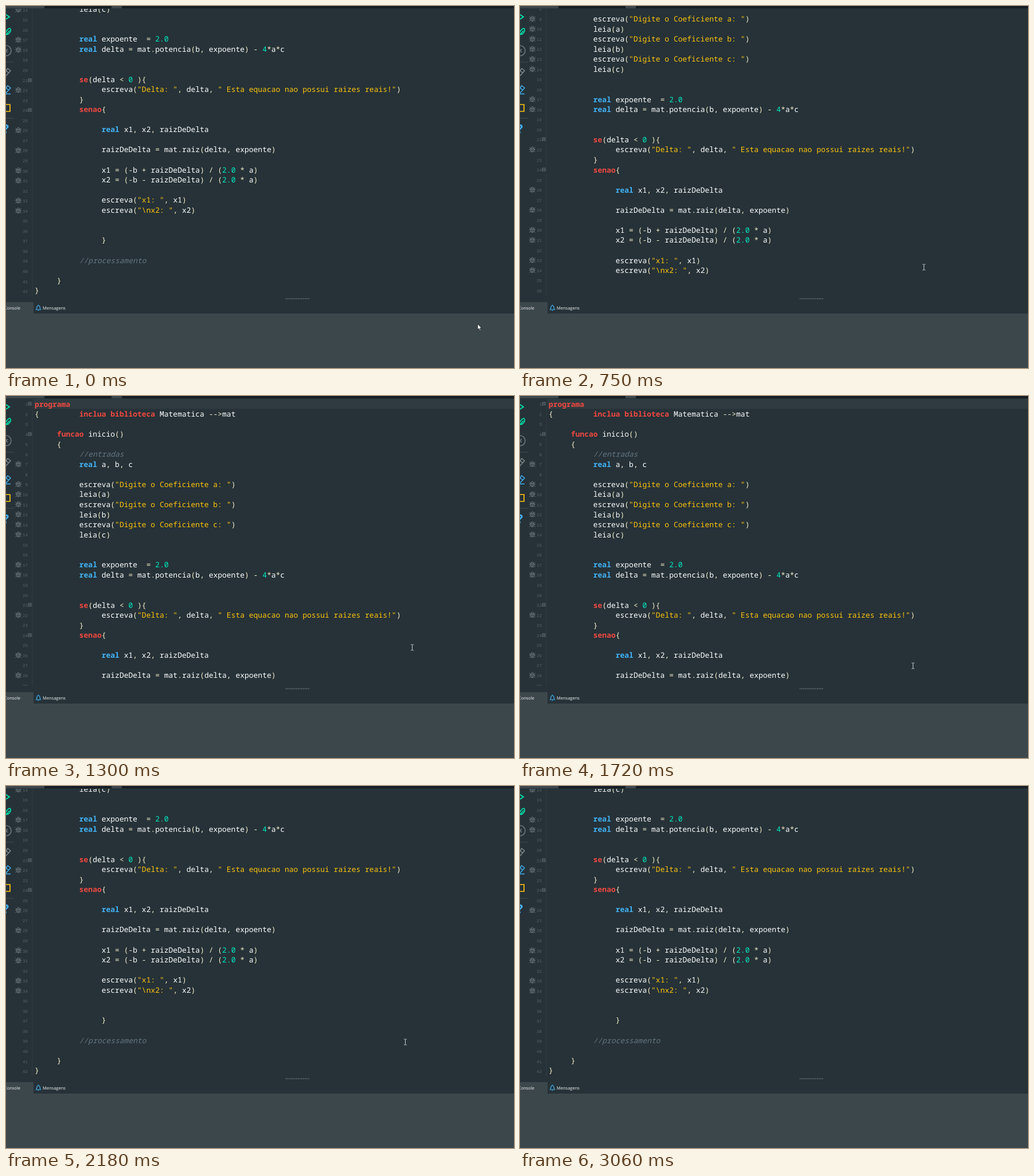
Animation, 886 px wide and 632 px high, one loop 3810 ms. Source, as an HTML page with a canvas:

```html
<!DOCTYPE html>
<html lang="pt">
<head>
<meta charset="utf-8">
<style>
html, body { margin: 0; height: 100%; overflow: hidden; background: #263238; }
canvas { display: block; }
</style>
</head>
<body>
<canvas id="stage" width="886" height="632"></canvas>
<script>
const ctx = document.getElementById('stage').getContext('2d');
ctx.textRendering = 'geometricPrecision';

const LOOP = 3810, TICK = 67.9, PITCH = 17.555, COL = 7.79;
const MONO = '"Noto Sans Mono", monospace';
const BLUE = '#42b4f8', GREEN = '#00e8b0', GRAY = '#7b868a', PANEL = '#3c474c';

const code = String.raw`programa
{         inclua biblioteca Matematica -->mat

     funcao inicio()
     {
          //entradas
          real a, b, c

          escreva("Digite o Coeficiente a: ")
          leia(a)
          escreva("Digite o Coeficiente b: ")
          leia(b)
          escreva("Digite o Coeficiente c: ")
          leia(c)


          real expoente  = 2.0
          real delta = mat.potencia(b, expoente) - 4*a*c


          se(delta < 0 ){
               escreva("Delta: ", delta, " Esta equacao nao possui raizes reais!")
          }
          senao{

               real x1, x2, raizDeDelta

               raizDeDelta = mat.raiz(delta, expoente)

               x1 = (-b + raizDeDelta) / (2.0 * a)
               x2 = (-b - raizDeDelta) / (2.0 * a)

               escreva("x1: ", x1)
               escreva("\nx2: ", x2)


               }

          //processamento

     }
}`.split('\n');

const token = /("[^"]*")|(\/\/.*)|\b(programa|inclua|biblioteca|funcao|senao|se)\b|\b(real)\b|\b(\d[\d.]*)|([^\s\w"]+)|\w+/g;
const styles = [
  ['#ffc40c', ''], ['#66757f', 'italic '], ['#f04840', 'bold '],
  [BLUE, 'bold '], ['#00eac0', ''], ['#f8eecb', ''], ['#ffffff', '']
];
const lines = code.map(line => [...line.matchAll(token)].map(m => {
  const kind = m.slice(1).findIndex(Boolean);
  return { text: m[0], x: 49.9 + m.index * COL, style: styles[kind < 0 ? 6 : kind] };
}));
const stoppable = /real|escreva|leia|^ +\w+ = /;
const foldable = [1, 4, 21, 24];

// [tick, first visible line]: three lines per wheel notch
const scrolls = [[0, 13.5], [8, 10.5], [10, 7.5], [12, 4.5], [14, 1.5], [16, 0],
  [27, 3], [28, 6], [29, 9], [30, 12], [31, 13.5]];

// [tick, x, y] of the pointer
const path = [[3, 735, 478], [4, 712, 462], [5, 703, 456], [8, 702, 455], [14, 705, 456],
  [18, 706, 452], [19, 708, 439], [20, 709, 438], [22, 700, 465], [24, 685, 479],
  [26, 684, 462], [27, 687, 451], [32, 696, 447], [34, 709, 444], [35, 711, 441],
  [37, 718, 436], [42, 790, 475]];

function rect(x, y, w, h, color) {
  ctx.fillStyle = color;
  ctx.fillRect(x, y, w, h);
}

function draw(x, y, d, stroke, width = 1, fill) {
  ctx.save();
  ctx.translate(x, y);
  const shape = new Path2D(d);
  if (fill) { ctx.fillStyle = fill; ctx.fill(shape); }
  if (stroke) { ctx.strokeStyle = stroke; ctx.lineWidth = width; ctx.stroke(shape); }
  ctx.restore();
}

function text(str, x, y, font, color, align = 'left') {
  ctx.font = font;
  ctx.fillStyle = color;
  ctx.textAlign = align;
  ctx.fillText(str, x, y);
}

function drawEditor(first) {
  ctx.save();
  ctx.beginPath();
  ctx.rect(15, 5, 871, 501);
  ctx.clip();
  const gutterShift = first === 13.5 ? 1.4 : 0;
  rect(48, 5 - first * PITCH, 838, 17.5, '#2f3b40');
  rect(45.5, 5, 1, 501, '#303c42');
  lines.forEach((tokens, i) => {
    const y = 14 + (i - first) * PITCH;
    if (y < -10 || y > 520) return;
    const gy = y + gutterShift;
    text(i + 1, 38, Math.round(gy + 3), '7.5px "Liberation Mono", monospace', '#56636a', 'right');
    if (stoppable.test(code[i])) {
      draw(21.5, gy - .5, 'M-2.5-1.5h5v3q0 3-2.5 3t-2.5-3zM-2-2q0-2.5 2-2.5t2 2.5M0-1v5M-2.5 0h-3M2.5 0h3M-2.5-1.5l-2.5-2M2.5-1.5l2.5-2M-2.5 2l-2.5 2.5M2.5 2l2.5 2.5', GRAY, .9);
    }
    if (foldable.includes(i + 1)) {
      draw(41.5, Math.round(gy - 1) + .5, 'M-2.5-2.5h5v5h-5zM-1.5 0h3', '#77848a', .8);
    }
    for (const { text: word, x, style: [color, face] } of tokens) {
      text(word, x, Math.round(y + 4.5), `${face}12.98px ${MONO}`, color);
    }
  });
  ctx.restore();
}

function drawToolbar() {
  draw(0, 19, 'M0-4L6 0L0 4', GREEN, 1.8);
  draw(3, 45, 'M-4 2Q0-6 4-6Q7-3 3 2Q0 6-3 4M-3 5L3-2', GREEN, 1.6);
  draw(0, 78, 'M9 0A9 9 0 1 1-9 0A9 9 0 1 1 9 0M-3-3L3 3M-3 3L3-3', '#69757a', 1.7);
  rect(0, 97.5, 14, 1, '#414c51');
  const pencil = 'M-4 4L3-6L8-2L0 7M0-2L5 2';
  draw(0, 115, pencil, '#858d90', 1.4);
  draw(0, 145, pencil + 'M0 8.5H8', BLUE, 1.4);
  draw(0, 178, 'M-4-6H7V6H-4', '#ffc20e', 1.7);
  rect(0, 195.5, 14, 1, '#414c51');
  text('?', 0, 222, 'bold 21px "Open Sans", sans-serif', BLUE, 'center');
}

function drawFrame() {
  rect(0, 0, 886, 632, '#263238');
  rect(0, 0, 886, 4, '#141e24');
  rect(0, 0, 67, 4, PANEL);
  rect(184, 0, 18, 4, PANEL);
  rect(0, 517, 48, 20, PANEL);
  rect(0, 537, 886, 95, PANEL);
  for (let x = 488; x < 528; x += 3) rect(x, 510.5, 1.3, 1, '#b4bcbf');
  const label = '7.5px "Open Sans", sans-serif';
  text('Console', 25, 530, label, '#f0f3f4', 'right');
  text('Mensagens', 64, 530, label, '#f0f3f4');
  draw(56.5, 527, 'M-4 3Q-2.5 1-2.5-1.5Q-2-4 0-4Q2-4 2.5-1.5Q2.5 1 4 3ZM-1 4.5H1M0-4V-5.5', BLUE, 1.2);
}

function drawArrow(x, y) {
  draw(x, y, 'M.5.5V10.5L2.8 8.4L4.6 12L6.2 11.2L4.5 7.8H7.4Z', '#11181b', .8, '#fff');
}

function drawPointer(tick) {
  if (tick < 1) return drawArrow(822, 554.5);
  if (tick < 3) return draw(771, 508.5, 'M0-7L3-3.5H.7V3.5H3L0 7L-3 3.5H-.7V-3.5H-3Z', '#11181b', .6, '#fff');
  if (tick >= 45) return;
  if (tick > 42) return tick === 43 ? drawArrow(822, 540) : drawArrow(861, 613);
  const i = path.findIndex(p => p[0] >= tick);
  const [t1, x1, y1] = path[i], [t0, x0, y0] = path[Math.max(i - 1, 0)];
  const k = t1 > t0 ? (tick - t0) / (t1 - t0) : 1;
  const at = (a, b) => Math.round(a + (b - a) * k);
  draw(at(x0, x1) + .5, at(y0, y1), 'M-2.5-5H-.8L0-4.2L.8-5H2.5M0-4.2V4.2M-2.5 5H-.8L0 4.2L.8 5H2.5', '#c9d0d2', 1);
}

function render(now) {
  const tick = Math.min(45, Math.floor(now % LOOP / TICK));
  drawFrame();
  drawEditor(scrolls.findLast(s => s[0] <= tick)[1]);
  drawToolbar();
  drawPointer(tick);
}

let start;
function loop(now) {
  start ??= now;
  render(now - start);
  requestAnimationFrame(loop);
}
render(0);
requestAnimationFrame(loop);
</script>
</body>
</html>
```
